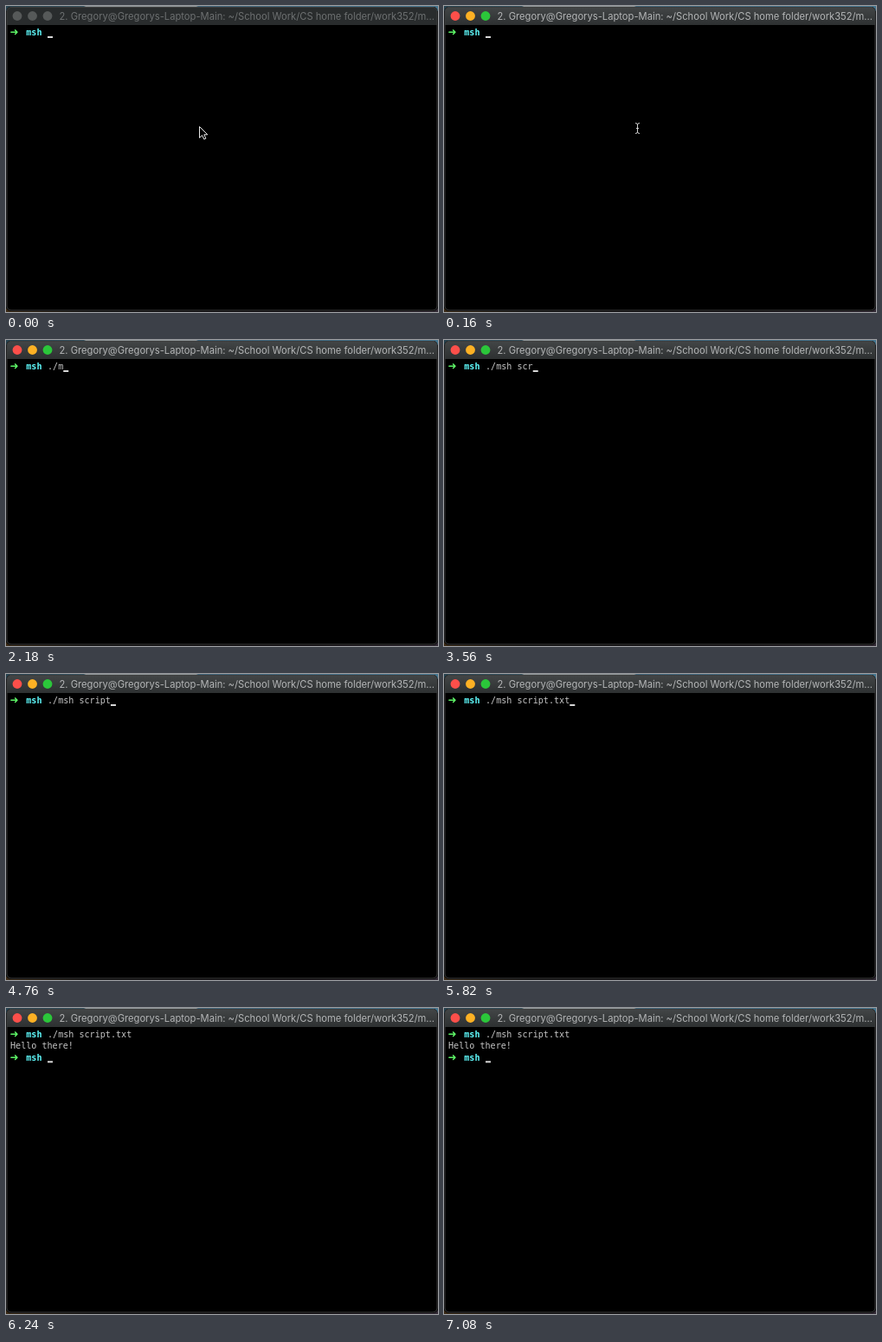
An HTML page that plays this animation: 499 by 354 pixels, repeating every 8 s.

```html
<!DOCTYPE html>
<html lang="en">
<head>
<meta charset="utf-8">
<title>Terminal</title>
<style>
  html, body { margin: 0; width: 100%; height: 100%; overflow: hidden; background: #000; }
  svg { display: block; }
  text { white-space: pre; }
  #title { font: 11.2px Inter, sans-serif; }
  .term { font: 10.1px "DejaVu Sans Mono", monospace; fill: #c7c7c7; }
  .arrow { font: bold 12px "DejaVu Sans", sans-serif; fill: #5ffa68; }
  .dir { font-weight: bold; fill: #60fdff; }
</style>
</head>
<body>
<svg width="499" height="354" viewBox="0 0 499 354">
  <defs>
    <linearGradient id="active" x2="0" y2="1">
      <stop stop-color="#434647"/><stop offset="1" stop-color="#2d3031"/>
    </linearGradient>
    <linearGradient id="desk">
      <stop stop-color="#26414e"/><stop offset=".18" stop-color="#34505d"/>
      <stop offset=".185" stop-color="#8b9294"/><stop offset=".44" stop-color="#8b9294"/>
      <stop offset=".445" stop-color="#3d6075"/><stop offset="1" stop-color="#44758f"/>
    </linearGradient>
    <linearGradient id="floor">
      <stop stop-color="#3a2a16"/><stop offset=".2" stop-color="#151515"/>
      <stop offset=".7" stop-color="#141014"/><stop offset="1" stop-color="#332a35"/>
    </linearGradient>
  </defs>
  <rect width="499" height="354" fill="#0c1114"/>
  <rect width="499" height="6" fill="url(#desk)"/>
  <rect y="350" width="499" height="4" fill="url(#floor)"/>
  <rect x=".5" y="1" width="498" height="352" rx="5" fill="#000"/>
  <path id="bar" d="M1 22V6a5 5 0 0 1 5-5H493a5 5 0 0 1 5 5V22Z"/>
  <path id="shine" d="M5 1.5H494" stroke="#686b6c"/>
  <rect x="1" y="1.5" width="497" height="350.5" rx="5" fill="none" stroke="#3c3c3c"/>
  <g id="lights">
    <circle cx="13" cy="11.5" r="5.4"/>
    <circle cx="30.5" cy="11.5" r="5.4"/>
    <circle cx="48" cy="11.5" r="5.4"/>
  </g>
  <text id="title" y="15.7"></text>
  <g id="prompt">
    <text class="arrow" x="4.6" y="34.3">➜</text>
    <text class="term dir" x="23.3" y="34">msh</text>
  </g>
  <use id="next" href="#prompt" y="26.6"/>
  <text id="command" class="term" x="48" y="34"></text>
  <text id="output" class="term" x="5" y="47.2">Hello there!</text>
  <rect id="cursor" width="6" height="2" fill="#d8d8d8"/>
  <path id="pointer" d="M223.5 139.5V152.5L226.6 149.6L228.8 154.2L230.9 153.2L228.8 148.8H232.8Z"
        fill="#000" stroke="#e8e8e8"/>
  <path id="beam" d="M221 135.5Q223.5 135.5 223.5 137.5Q223.5 135.5 226 135.5M223.5 137V146M221 147.5Q223.5 147.5 223.5 145.5Q223.5 147.5 226 147.5M222 141.5H225"
        fill="none" stroke="#d0d0d0"/>
</svg>
<script>
const $ = id => document.getElementById(id);
const LOOP = 8000, CELL = 6.08;
const COMMAND = "./msh script.txt";
const KEYS = [1480, 1680, 2180, 2380, 2500, 2700, 3080, 3320,
              3560, 3760, 3860, 4760, 5080, 5220, 5500, 5820];
const HOME = "2. Gregory@Gregorys-Laptop-Main: ~/School Work/CS home folder/work352/m...";
const RUNNING = "2. ./msh script.txt (zsh)";
const COLORS = ["#fc4f4a", "#fdb124", "#2bc63a"];

const show = (id, on) => $(id).setAttribute("visibility", on ? "visible" : "hidden");

function draw(t) {
  const focused = t >= 120;
  const running = t >= 6140 && t < 6240;
  const entered = t >= 6160, done = t >= 6200;
  const typed = KEYS.filter(k => t >= k).length;

  $("bar").setAttribute("fill", focused ? "url(#active)" : "#292c2d");
  show("shine", focused);
  [...$("lights").children].forEach((dot, i) =>
    dot.setAttribute("fill", focused ? COLORS[i] : "#565959"));

  $("title").textContent = running ? RUNNING : HOME;
  $("title").setAttribute("x", running ? 188 : 61.5);
  $("title").setAttribute("fill", focused ? "#b4b6b7" : "#6d7071");

  $("command").textContent = COMMAND.slice(0, typed);
  show("output", done);
  show("next", done);

  const col = done ? 0 : entered ? -7 : typed;
  $("cursor").setAttribute("x", 48 + col * CELL);
  $("cursor").setAttribute("y", done ? 61.3 : entered ? 48 : 35);

  show("pointer", t < 160);
  show("beam", t >= 160 && t < 1520);
}

function tick() {
  draw(performance.now() % LOOP);
  requestAnimationFrame(tick);
}
tick();
</script>
</body>
</html>
```
